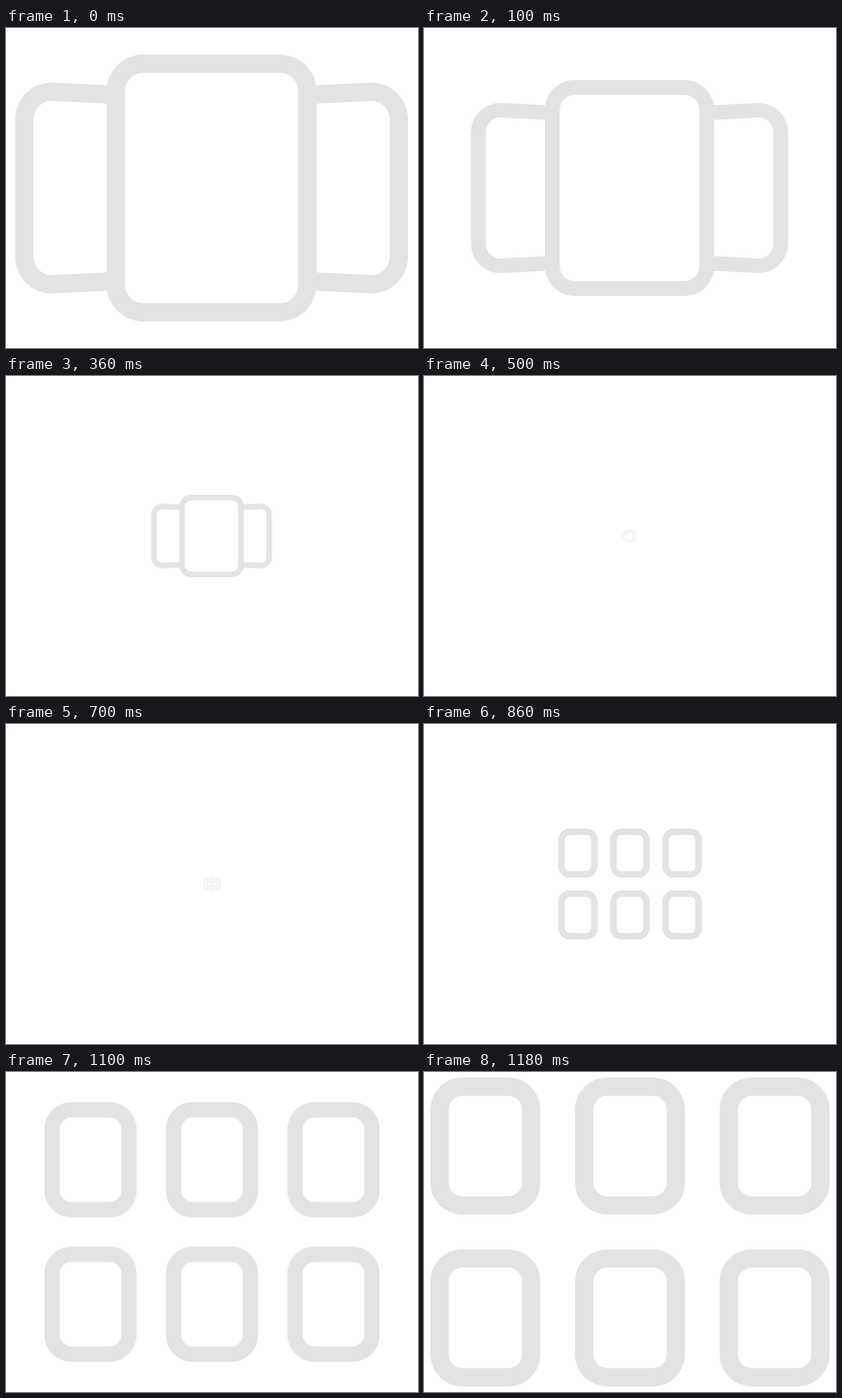
These frames come from a looping animation (450x350 px, 1.2 s). An HTML page with a canvas:

```html
<!DOCTYPE html>
<html lang="en">
<head>
<meta charset="utf-8">
<title>Carousel to grid</title>
<style>
html, body { margin: 0; width: 100%; height: 100%; overflow: hidden; background: #fff; }
canvas { display: block; }
</style>
</head>
<body>
<canvas id="stage" width="450" height="350"></canvas>
<script>
const ctx = document.getElementById('stage').getContext('2d');
const LOOP = 1200, STEP = 20;

function card(x, y, w, h, r) {
  ctx.beginPath();
  ctx.roundRect(x - w / 2, y - h / 2, w, h, r);
  ctx.stroke();
}

// A card turned away, open towards the middle; side is -1 or 1
function sideCard(side) {
  const near = side * 109.5, far = side * 204.5;
  ctx.beginPath();
  ctx.moveTo(near, -102.05);
  ctx.arcTo(far, -106.8, far, 0, 30);
  ctx.arcTo(far, 106.8, near, 102.05, 30);
  ctx.lineTo(near, 102.05);
  ctx.stroke();
}

function carousel() {
  sideCard(-1);
  sideCard(1);
  card(0, 0, 209, 272, 30);
}

function grid() {
  for (const y of [-94, 94])
    for (const x of [-158, 0, 158]) card(x, y, 100, 130, 25);
}

function zoomed(shape, cx, scale) {
  if (scale <= 0) return;
  ctx.save();
  ctx.translate(cx, 175);
  ctx.scale(scale, scale);
  ctx.lineWidth = 20;
  ctx.strokeStyle = '#e3e3e3';
  shape();
  ctx.restore();
}

function draw(now) {
  const t = Math.floor((now % LOOP) / STEP) * STEP;
  ctx.fillStyle = '#fff';
  ctx.fillRect(0, 0, 450, 350);
  zoomed(carousel, 224.5, 1 - t / 520);
  zoomed(grid, 225, (t - 680) / 500);
}

let start;
function tick(now) {
  start ??= now;
  draw(now - start);
  requestAnimationFrame(tick);
}
draw(0);
requestAnimationFrame(tick);
</script>
</body>
</html>
```
